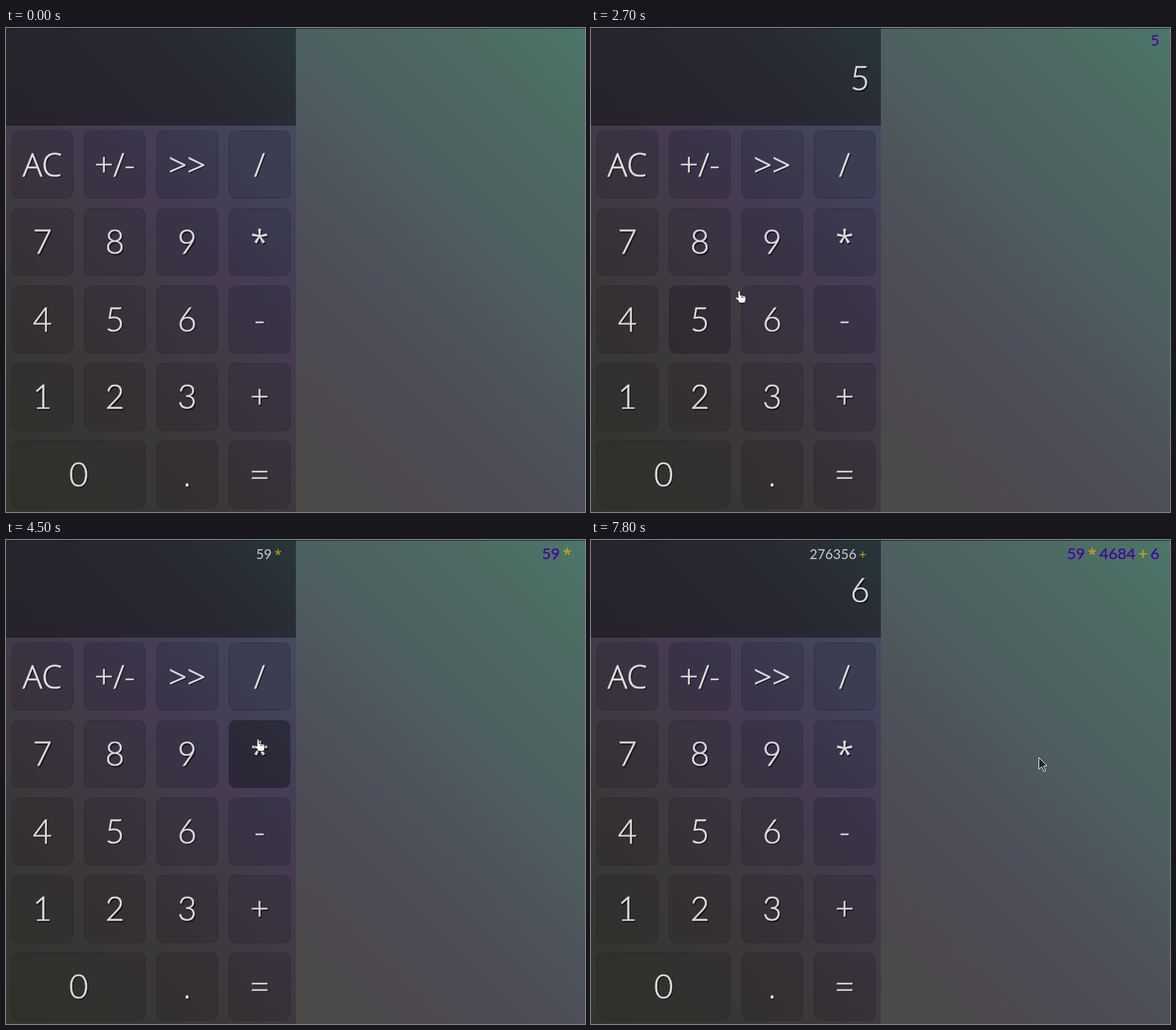
An HTML page with a canvas for the animation above (8 s loop, 819 px wide and 684 px high).

```html
<!DOCTYPE html>
<html lang="en">
<head>
<meta charset="utf-8">
<title>Calculator</title>
<style>
  html, body { margin: 0; width: 100%; height: 100%; overflow: hidden; background: #3c3a42; }
  canvas { display: block; width: 819px; height: 684px; }
</style>
</head>
<body>
<canvas id="stage" width="819" height="684"></canvas>
<script>
const W = 819, H = 684, LOOP = 8000, STEP = 100;
const PANEL = 410, SCREEN = 138, COL = 102.4, ROW = 109.5;
const ctx = document.getElementById('stage').getContext('2d');

// 45 degree page gradient with colours spread evenly between two positions
function diagonal(from, to, colors) {
  const half = (W + H) / 4;
  const g = ctx.createLinearGradient(W / 2 - half, H / 2 + half, W / 2 + half, H / 2 - half);
  colors.split(' ').forEach((color, i, all) =>
    g.addColorStop(from + (to - from) * i / (all.length - 1), color));
  return g;
}

const pageFill = diagonal(.27, 1, '#4b4a47 #4d4950 #4d505a #4e5f60 #4e6862 #4b7769');
const padFill = diagonal(0, .64, '#33342e #373533 #3b383a #3f3a43 #463b51 #434059 #434c62');
const keyFill = diagonal(0, .57, '#2f302a #31312e #363034 #3a323f #3a3449 #3b3e51');
const screenFill = diagonal(.36, .73, '#26232b #272430 #282a34 #28363b');

const rows = ['AC +/- >> /', '7 8 9 *', '4 5 6 -', '1 2 3 +', '0  . ='];
const buttons = rows.flatMap((row, r) => row.split(' ').map((label, c) => ({
  label,
  x: 8.5 + c * COL,
  y: 145.5 + r * ROW,
  w: COL * (label === '0' ? 2 : 1) - 16.4,
  h: 95
}))).filter(b => b.label);

const presses = [[2300, '5'], [3300, '9'], [4000, '*'], [5700, '4'], [5900, '6'],
  [6200, '8'], [6300, '4'], [6900, '+'], [7400, '6']];

// Pointer moves: start, duration, x, y
const origin = [399, 98];
const moves = [
  [500, 400, 32, 285], [900, 400, 262, 325], [1400, 100, 275, 340], [1500, 200, 310, 445],
  [1700, 200, 103, 450], [1900, 200, 144, 423], [2600, 100, 204, 371],
  [2700, 300, 252, 287], [3700, 200, 346, 281], [4400, 600, 633, 307]
];

const ease = u => u < .5 ? 4 * u ** 3 : 1 - 4 * (1 - u) ** 3;

function pointer(t) {
  let [x, y] = origin;
  for (const [start, duration, toX, toY] of moves) {
    const k = ease(Math.min(1, Math.max(0, (t - start) / duration)));
    x += (toX - x) * k;
    y += (toY - y) * k;
  }
  return { x, y };
}

const isOp = token => /^[*+]$/.test(token);

function calculate(t) {
  const state = { entry: '', total: '', op: '', history: '' };
  for (const [time, key] of presses) {
    if (time > t) break;
    if (isOp(key)) {
      const a = +state.total, b = +state.entry;
      state.total = String(state.op === '*' ? a * b : a + b);
      state.op = key;
      state.entry = '';
      state.history += ` ${key} `;
    } else {
      state.entry += key;
      state.history += key;
    }
  }
  return state;
}

function hovers(b, t) {
  if (t < moves[0][0]) return false;
  const p = pointer(t), x = p.x + 5;
  return x > b.x && x < b.x + b.w && p.y > b.y && p.y < b.y + b.h;
}

function pressLevel(label, t) {
  const ages = presses.filter(p => p[1] === label && p[0] <= t).map(p => t - p[0]);
  return Math.max(0, 1 - Math.min(...ages) / 400);
}

function setFont(text, size, weight) {
  const family = /\d/.test(text) ? 'Lato, "Open Sans"' : '"Open Sans", Lato';
  ctx.font = `${weight} ${size}px ${family}, sans-serif`;
}

function drawText(text, x, y, color, align, outline) {
  ctx.textAlign = align;
  ctx.fillStyle = ctx.strokeStyle = color;
  ctx.lineWidth = outline;
  ctx.fillText(text, x, y);
  if (outline) ctx.strokeText(text, x, y);
}

function drawLarge(text, x, y, align, press) {
  const shade = 220 + 35 * press;
  setFont(text, 46.5, 300);
  drawText(text, x + 1.5, y + 1.5, 'rgba(0,0,0,.55)', align, .6);
  drawText(text, x, y, `rgb(${shade},${shade},${shade})`, align, .7 + .5 * press);
}

function drawButton(b, t) {
  const press = pressLevel(b.label, t);
  const hover = hovers(b, t) ? .5 : hovers(b, t - STEP) ? .25 : 0;
  ctx.beginPath();
  ctx.roundRect(b.x, b.y, b.w, b.h, 9);
  ctx.fillStyle = keyFill;
  ctx.fill();
  ctx.fillStyle = `rgba(28,27,35,${Math.max(press, hover) * .92})`;
  ctx.fill();
  ctx.strokeStyle = 'rgba(20,16,24,.3)';
  ctx.lineWidth = 1;
  ctx.stroke();
  drawLarge(b.label, b.x + b.w / 2, b.y + b.h / 2 + 16.5, 'center', press);
}

// Right-aligned expression, laid out from its end
function drawTokens(tokens, right, y, size, color, outline) {
  const gap = size * .19;
  let x = right;
  [...tokens].reverse().forEach((token, i) => {
    if (i) x -= gap;
    setFont(token, size, 400);
    drawText(token, x, y, isOp(token) ? '#c9a41c' : color, 'right', outline);
    x -= ctx.measureText(token).width;
  });
}

function drawReadout(t) {
  const { entry, total, op, history } = calculate(t);
  const y = op ? 26.5 : 25;
  drawLarge(entry, 394, 88, 'right', 0);
  if (op) drawTokens([total, op, ''], 393.5, y, 19, '#cccccf', 0);
  drawTokens(history.split(' '), 804, y, 22, '#4300a2', op ? .25 : 0);
}

const handShape = new Path2D('M4 1.5Q5.5-.5 7 1.5V6.5L13 7.5Q15 8 15 10V13L13.5 17.5H5.5' +
  'L4.5 14.5L.8 11.5Q-.2 9.5 1.8 9L4 10.5Z');
const fingers = new Path2D('M9.5 8V10.5M12 8.5V10.5');
const arrowShape = new Path2D('M.5 .5V17L4.5 13.5L7.2 20L10 18.8L7.2 12.5L12 12Z');

function drawPointer(t) {
  if (t < moves[0][0]) return;
  const { x, y } = pointer(t);
  const hand = x < PANEL && y > SCREEN;
  const shape = hand ? handShape : arrowShape;
  ctx.save();
  ctx.translate(Math.round(x), Math.round(y));
  ctx.lineWidth = 1;
  ctx.lineJoin = 'round';
  ctx.fillStyle = hand ? '#fff' : '#25262a';
  ctx.strokeStyle = hand ? '#222' : '#f2f2f2';
  ctx.fill(shape);
  ctx.stroke(shape);
  if (hand) ctx.stroke(fingers);
  ctx.restore();
}

function rect(fill, w, h) {
  ctx.fillStyle = fill;
  ctx.fillRect(0, 0, w, h);
}

function draw(t) {
  rect(pageFill, W, H);
  rect(padFill, PANEL, H);
  rect(screenFill, PANEL, SCREEN);
  rect('rgba(20,22,25,.8)', W, 1);
  for (const b of buttons) drawButton(b, t);
  drawReadout(t);
  drawPointer(t);
}

const start = performance.now();
function frame() {
  const t = (performance.now() - start) % LOOP;
  draw(Math.floor(t / STEP) * STEP);
  requestAnimationFrame(frame);
}
frame();
</script>
</body>
</html>
```
